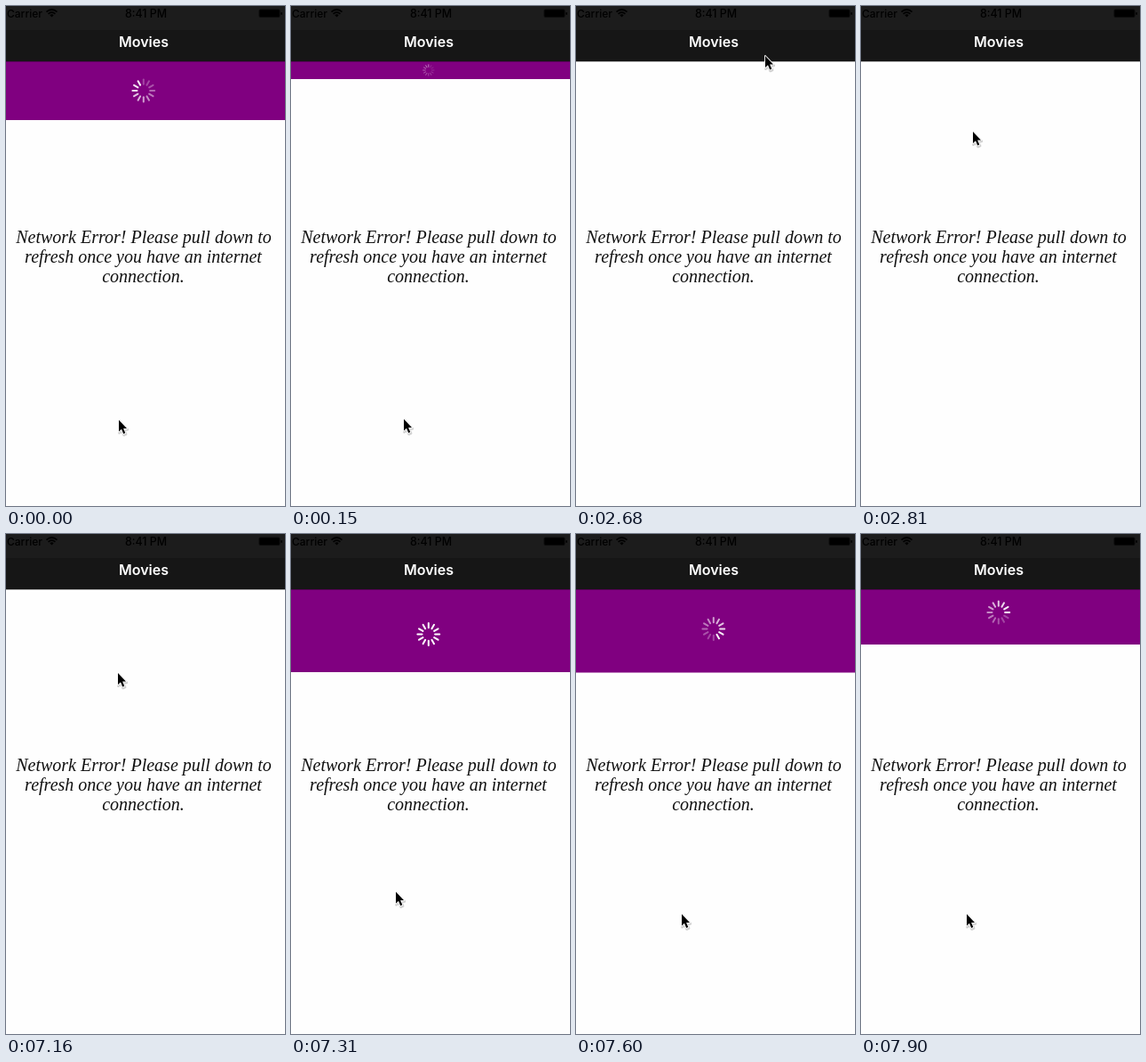
These frames come from a looping animation (314 by 561 pixels, 8 s). An HTML page:

```html
<!DOCTYPE html>
<html lang="en">
<head>
<meta charset="utf-8">
<title>Pull to refresh</title>
<style>
  html, body { margin: 0; height: 100%; overflow: hidden; background: #fefefe; }
  svg { display: block; width: 314px; height: 561px; }
  .status { font: 500 12px Inter, sans-serif; }
  .title { font: 600 16px Inter, sans-serif; fill: #fff; }
  .message { font: italic 20px "Liberation Serif", serif; fill: #111; }
  .middle { text-anchor: middle; }
</style>
</head>
<body>
<svg viewBox="0 0 314 561">
  <rect id="panel" y="62" width="314" fill="#800080"/>
  <g id="spinner" stroke="#fff" stroke-width="2" stroke-linecap="round"></g>

  <rect width="314" height="62" fill="#161616"/>
  <rect width="314" height="27" fill="#1c1c1c"/>
  <rect y="62" width="314" height="1" fill-opacity=".3"/>
  <text class="status" x="1" y="13">Carrier</text>
  <g fill="none" stroke="#000" stroke-width="1.7">
    <path d="M45.5 6.6Q51.5 1.4 57.5 6.6M47.6 8.9Q51.5 5.5 55.4 8.9"/>
    <path d="M49.3 10.2Q51.5 8.4 53.7 10.2L51.5 12.5Z" fill="#000" stroke="none"/>
  </g>
  <text class="status middle" x="157.5" y="13" font-size="12.4" style="font-size: 12.4px">8:41 PM</text>
  <rect x="284.5" y="3.5" width="24" height="9.5" rx="2" fill-opacity=".6"/>
  <rect x="285.5" y="4.5" width="22" height="7.5" rx="1"/>
  <rect x="309.3" y="7" width="1.5" height="3" rx=".7"/>
  <text class="title middle" x="155" y="46">Movies</text>

  <g class="message middle">
    <text x="155" y="265.5">Network Error! Please pull down to</text>
    <text x="154.5" y="287.5">refresh once you have an internet</text>
    <text x="154.5" y="309.5">connection.</text>
  </g>

  <g id="cursor" stroke-linejoin="round">
    <path d="M0 0V13L3 10.2 5.2 15.4 7.3 14.5 5.1 9.4H9Z" transform="translate(.6 1.4)"
          fill="none" stroke="#000" stroke-opacity=".18" stroke-width="3"/>
    <path d="M0 0V13L3 10.2 5.2 15.4 7.3 14.5 5.1 9.4H9Z"
          stroke="#fff" stroke-width="1.8" paint-order="stroke"/>
  </g>
</svg>
<script>
const LOOP = 8000, SPOKES = 12;
const [panel, spinner, cursor] = ["panel", "spinner", "cursor"].map(id => document.getElementById(id));

for (let i = 0; i < SPOKES; i++) {
  const spoke = document.createElementNS(spinner.namespaceURI, "path");
  spoke.setAttribute("d", "M0-7.3V-12.4");
  spoke.setAttribute("transform", `rotate(${i * 360 / SPOKES})`);
  spinner.append(spoke);
}

// Each pose holds until the next. A spin without a head has all spokes lit.
const poses = [
  { at: 0, height: 66, spin: { y: 95, head: 11 }, pointer: [127, 464.5] },
  { at: 150, height: 20, spin: { y: 72, head: 0, scale: .5, alpha: .5 }, pointer: [127, 463.5] },
  { at: 300, height: 5 },
  { at: 450, height: 1 },
  { at: 600, height: 0 },
  { at: 2680, height: 0, pointer: [213, 56] },
  { at: 2810, height: 0, pointer: [126, 141] },
  { at: 7160, height: 0, pointer: [126, 156] },
  { at: 7310, height: 93, spin: { y: 112.5 }, pointer: [118, 401.5] },
  { at: 7460, height: 93, spin: { y: 112.5 }, pointer: [119, 426.5] },
  { at: 7600, height: 93.5, spin: { y: 106.5, head: 5 }, pointer: [119, 426.5] },
  { at: 7750, height: 69, spin: { y: 95.5, head: 4 }, pointer: [119, 426.5] },
  { at: 7900, height: 62, spin: { y: 88, head: 3 }, pointer: [119, 426.5] }
];

const show = (node, visible) => node.setAttribute("visibility", visible ? "visible" : "hidden");

function draw(now) {
  const time = now % LOOP;
  const { height, spin, pointer } = poses.findLast(pose => pose.at <= time);
  panel.setAttribute("height", height);

  show(spinner, spin);
  if (spin) {
    const { y, head, scale = 1, alpha = 1 } = spin;
    spinner.setAttribute("transform", `translate(154.8 ${y}) scale(${scale})`);
    [...spinner.children].forEach((spoke, i) => {
      const age = head === undefined ? 0 : (head - i + SPOKES) % SPOKES;
      spoke.setAttribute("opacity", alpha * Math.max(.28, 1 - age * .075));
    });
  }

  show(cursor, pointer);
  if (pointer) cursor.setAttribute("transform", `translate(${pointer})`);
  requestAnimationFrame(draw);
}
requestAnimationFrame(draw);
</script>
</body>
</html>
```
